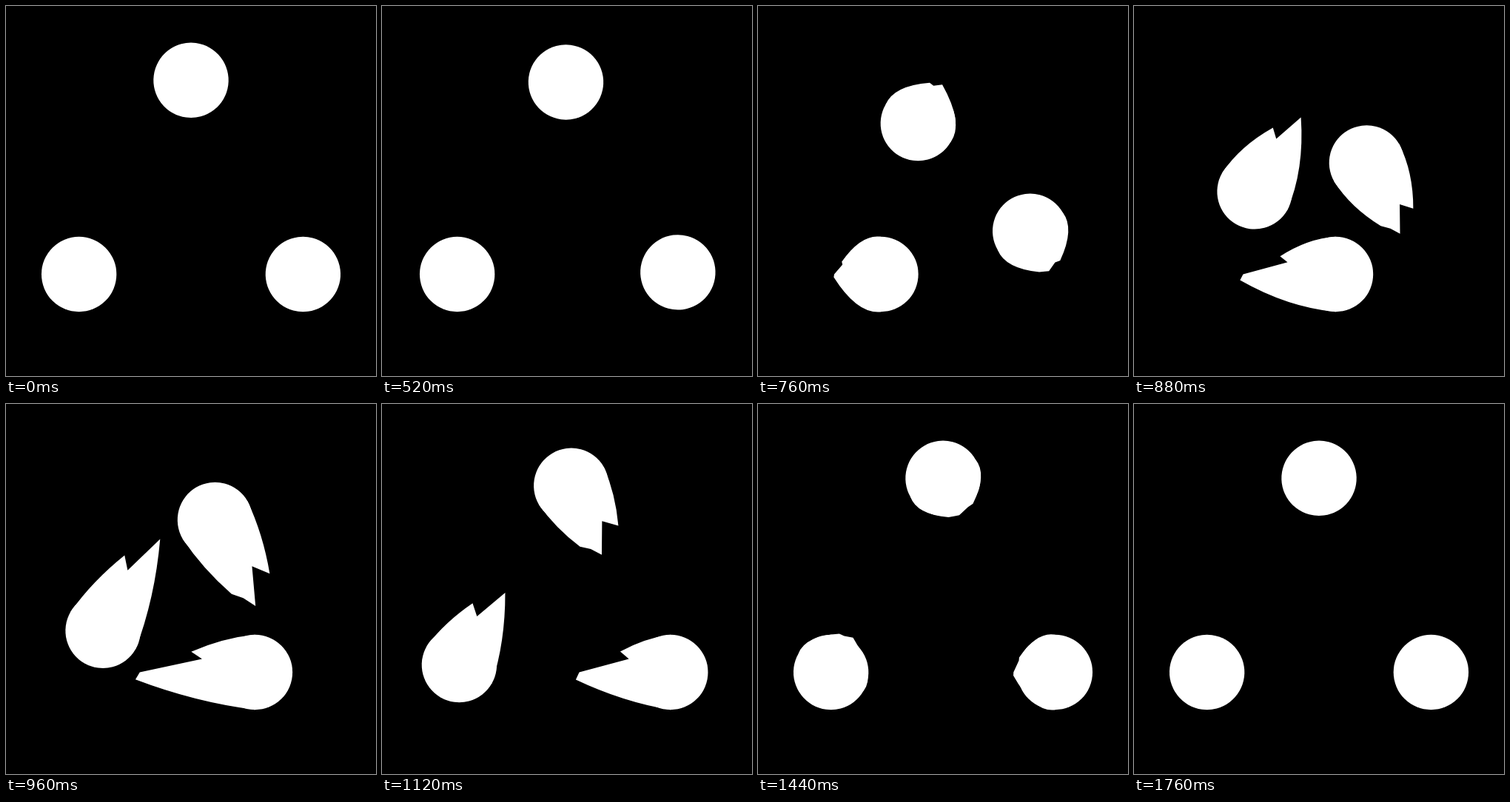
Animation of 500 by 500 pixels, one loop 1.8 s. Source, as an HTML page with a canvas:

```html
<!DOCTYPE html>
<html lang="en">
<head>
<meta charset="utf-8">
<title>Three chasing drops</title>
<style>
  html, body { margin: 0; height: 100%; overflow: hidden; background: #000; }
  canvas { display: block; }
</style>
</head>
<body>
<canvas id="stage" width="500" height="500"></canvas>
<script>
const ctx = document.getElementById('stage').getContext('2d');
const LOOP = 1800, STEP = 40;
const R = 50.7;                                    // drop radius
const ORBIT = 174.8;                               // stage centre to triangle corner
const HALF_SIDE = ORBIT * Math.sqrt(3) / 2;

// Spikes and notches of each torn tail; the drop moves towards +x.
const tails = [
  [[-87, -28], [-72, -18], [-158, 0], [-164, 10]],
  [[-99, -31], [-112, -20], [-130, -11], [-80, 12], [-101, 28]],
  [[-148, -5], [-88, 12], [-104, 26]]
];

const span = (t, start, length) => Math.min(1, Math.max(0, (t - start) / length));
const smooth = x => x * x * (3 - 2 * x);
const mix = (a, b, k) => a + (b - a) * k;

// Cubic bezier ease (a, 0, 1 - a, 1), solved by bisection.
function ease(x, a = 0.66) {
  let lo = 0, hi = 1;
  for (let i = 0; i < 30; i++) {
    const s = (lo + hi) / 2, r = 1 - s;
    if (3 * a * s * r * r + 3 * (1 - a) * s * s * r + s * s * s < x) lo = s;
    else hi = s;
  }
  return smooth(lo);
}

function drawDrop(tail, stretch, shrink) {
  // Tail points grow outward from the rim of the circle.
  const edge = tail.map(([x, y]) => {
    x *= shrink;
    const k = mix(R / Math.hypot(x, y), 1, stretch);
    return [x * k, y * k];
  });
  // Sides bulge while the tail is short and straighten as it stretches.
  const control = ([x, y], side) =>
    [x / 2, side * mix(56, 37 + Math.abs(y) / 3, stretch)];
  const first = edge[0], last = edge[edge.length - 1];

  ctx.beginPath();
  ctx.arc(0, 0, R, 0, 2 * Math.PI);
  ctx.fill();
  if (!stretch) return;
  ctx.beginPath();
  ctx.moveTo(0, -R);
  ctx.quadraticCurveTo(...control(first, -1), ...first);
  edge.forEach(p => ctx.lineTo(...p));
  ctx.quadraticCurveTo(...control(last, 1), 0, R);
  ctx.fill();
}

function draw(t) {
  const x = mix(-HALF_SIDE, HALF_SIDE, ease(span(t, 428, 860)));
  const stretch = t < 1120
    ? smooth(span(t, 700, 285))
    : (1 - span(t, 1120, 440)) ** 2;
  const shrink = mix(1, 0.78, span(t, 960, 160));

  ctx.fillStyle = '#000';
  ctx.fillRect(0, 0, 500, 500);
  ctx.fillStyle = '#fff';
  tails.forEach((tail, i) => {
    ctx.save();
    ctx.translate(250, 275.1);
    ctx.rotate(-i * 2 * Math.PI / 3);
    ctx.translate(x, ORBIT / 2);
    drawDrop(tail, stretch, shrink);
    ctx.restore();
  });
}

const start = performance.now();
function frame() {
  const t = (performance.now() - start) % LOOP;
  draw(Math.floor(t / STEP) * STEP);
  requestAnimationFrame(frame);
}
frame();
</script>
</body>
</html>
```
